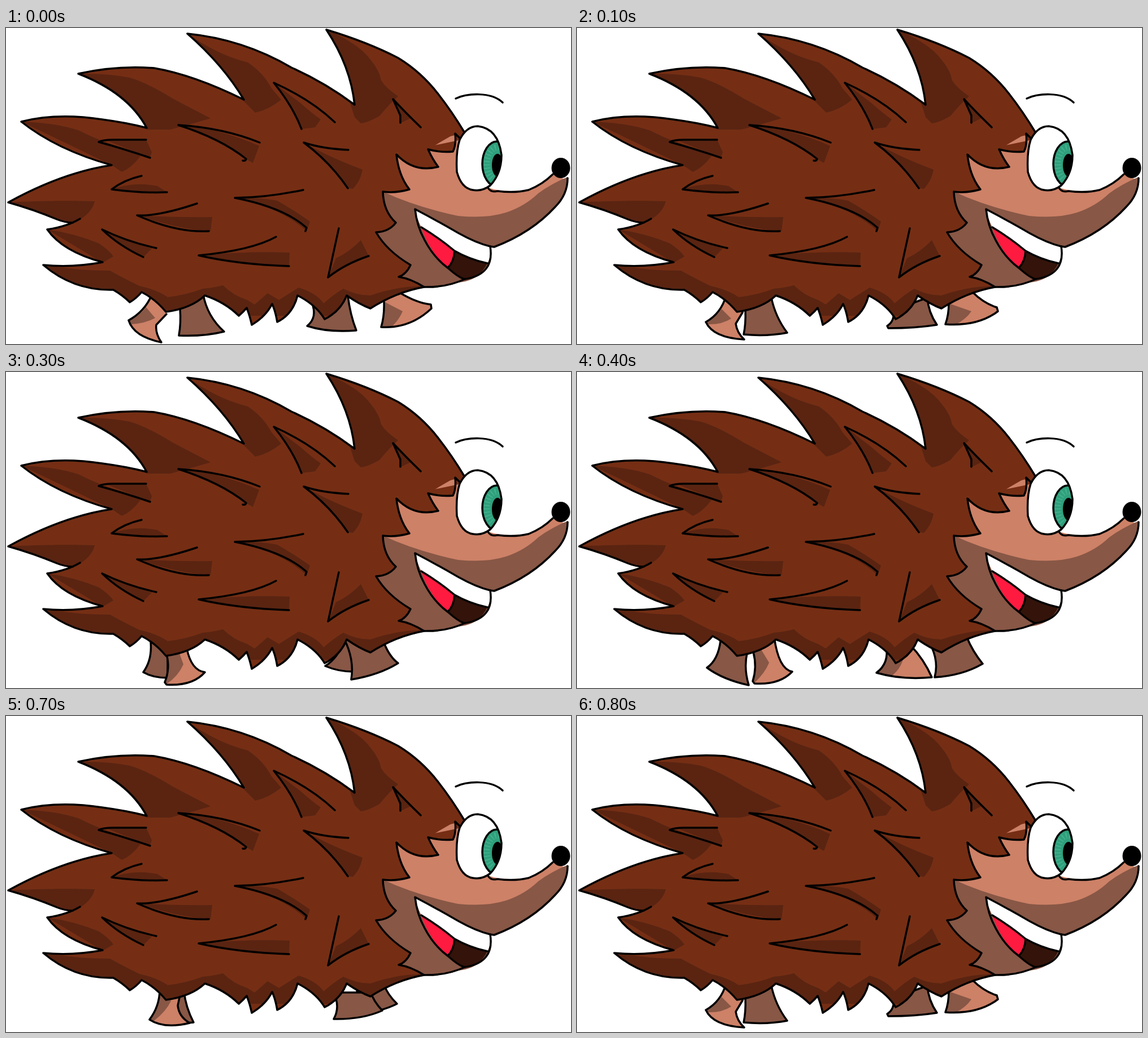
An HTML page for the animation above (0.9 s loop, 1000 by 560 pixels).

```html
<!DOCTYPE html>
<html lang="en">
<head>
<meta charset="utf-8">
<title>Walking hedgehog</title>
<style>
  html, body { margin: 0; width: 100%; height: 100%; overflow: hidden; background: #fff; }
  svg { display: block; width: 100vw; height: 100vh; }
  .fur { fill: #752e14; }
  .shade { fill: #5a2411; }
  .skin { fill: #cd8167; }
  .dim { fill: #885746; }
  .ink { fill: none; }
  .ink, .line { stroke: #000; stroke-width: 3.5; stroke-linecap: round; stroke-linejoin: round; }

  /* The stride swings through five poses and back again. */
  .pose { opacity: 0; animation: 900ms step-end infinite; }
  .p1 { animation-name: p1; }
  .p2 { animation-name: p2; }
  .p3 { animation-name: p3; }
  .p4 { animation-name: p4; }
  .p5 { animation-name: p5; }
  @keyframes p1 { 0% { opacity: 1 } 11.111%, 100% { opacity: 0 } }
  @keyframes p2 { 0%, 22.222% { opacity: 0 } 11.111%, 88.888%, 100% { opacity: 1 } }
  @keyframes p3 { 0%, 33.333%, 88.888%, 100% { opacity: 0 } 22.222%, 77.777% { opacity: 1 } }
  @keyframes p4 { 0%, 44.444%, 77.777%, 100% { opacity: 0 } 33.333%, 66.666% { opacity: 1 } }
  @keyframes p5 { 0%, 66.666%, 100% { opacity: 0 } 44.444% { opacity: 1 } }
</style>
</head>
<body>
<svg viewBox="0 0 1000 560" preserveAspectRatio="none">
  <defs>
    <path id="back" d="M118 345Q105 345 90 339Q50 322 4 309Q100 256 187 243Q90 216 27 166Q90 150 170 162Q215 168 249 177Q216 115 128 81Q195 66 262 71Q332 83 421 127Q385 66 321 10Q420 20 505 70Q565 97 617 136Q610 68 567 3Q640 25 694 53Q735 78 765 117Q790 149 812 186"/>
    <path id="belly" d="M806 198L795 187Q797 208 791 219Q768 221 747 215Q755 233 765 246Q722 257 691 224Q695 262 714 286Q690 293 667 290Q668 325 690 345Q678 361 655 362Q674 395 716 420Q708 437 695 441Q716 444 740 459Q690 468 645 497Q626 490 603 474Q592 502 564 516Q548 490 516 474Q508 507 480 521Q477 502 471 489Q460 511 435 526Q431 508 426 496Q420 503 412 510Q388 486 352 474Q328 497 283 503Q264 480 240 468Q231 479 219 486Q207 474 190 464Q120 466 66 420Q118 425 171 415Q100 396 73 357Q108 352 131 338"/>
    <path id="eye" d="M803 198Q815 174 835 174Q871 178 877 225Q877 258 857 279Q843 290 826 287Q806 284 798 255Q796 219 803 198Z"/>
    <clipPath id="furClip"><use href="#back"/><use href="#belly"/></clipPath>
    <clipPath id="eyeClip"><use href="#eye"/></clipPath>
  </defs>

  <g class="pose p1">
    <path class="skin" d="M260 470Q245 503 217 518Q226 547 275 557Q264 541 266 526L284 507L285 490Z"/>
    <path class="dim" d="M248 495Q236 511 217 518L221 525Q245 524 264 514Z"/>
    <path class="ink" d="M258 473Q245 503 217 518Q226 547 275 557Q264 541 266 526L284 507"/>
    <path class="dim line" d="M308 498Q310 522 306 545Q350 547 386 538Q356 511 349 472Z"/>
    <path class="dim line" d="M541 486Q552 513 533 528Q570 540 620 536Q609 508 605 474Z"/>
    <path class="skin" d="M669 485Q670 510 664 530Q715 533 753 497L752 490Q728 488 695 468Z"/>
    <path class="dim" d="M669 485Q670 510 664 530L682 530Q696 517 702 502Z"/>
    <path class="ink" d="M669 485Q670 510 664 530Q715 533 753 497L752 490Q728 488 695 468"/>
  </g>

  <g class="pose p2">
    <path class="skin" d="M264 474Q255 506 228 521Q241 549 296 552Q283 540 281 524L293 504L285 490Z"/>
    <path class="dim" d="M256 498Q246 513 228 521L233 525Q255 526 273 515Z"/>
    <path class="ink" d="M264 474Q255 506 228 521Q241 549 296 552Q283 540 281 524L293 504"/>
    <path class="dim line" d="M298 500Q299 524 295 543Q335 547 372 540Q351 512 344 478Z"/>
    <path class="dim line" d="M560 500Q563 519 549 528L551 532Q600 532 637 526Q622 504 620 478Z"/>
    <path class="skin" d="M658 488Q658 509 652 525Q710 529 745 502L743 495Q720 488 700 468Z"/>
    <path class="dim" d="M658 488Q658 509 652 525L669 526Q689 516 698 502Z"/>
    <path class="ink" d="M658 488Q658 509 652 525Q710 529 745 502L743 495Q720 488 700 468"/>
  </g>

  <g class="pose p3">
    <path class="dim line" d="M277 490Q279 518 270 539Q300 546 332 543Q318 516 315 488Z"/>
    <path class="skin" d="M272 485Q272 514 254 538Q280 555 325 544Q306 533 304 513L309 490Z"/>
    <path class="dim" d="M272 485Q272 514 254 538L262 540Q283 524 292 505Z"/>
    <path class="ink" d="M272 485Q272 514 254 538Q280 555 325 544Q306 533 304 513L309 490"/>
    <path class="dim line" d="M622 482Q619 510 608 525Q655 529 692 510Q675 493 670 478Z"/>
    <path class="dim line" d="M580 490Q592 516 580 537Q630 538 666 522Q650 505 646 490Z"/>
  </g>

  <g class="pose p4">
    <path class="dim line" d="M256 478Q259 510 243 532Q260 542 286 542V495Z"/>
    <path class="skin" d="M284 500Q291 525 281 550L284 554Q330 557 352 532Q328 529 320 490Z"/>
    <path class="dim" d="M284 500Q291 525 281 550L284 553Q305 539 314 518L306 496Z"/>
    <path class="ink" d="M284 500Q291 525 281 550L284 554Q330 557 352 532Q328 529 320 490"/>
    <path class="dim line" d="M598 476Q588 507 565 521Q588 531 615 531L610 490Z"/>
    <path class="dim line" d="M598 472Q617 509 611 545Q660 537 694 516Q679 505 669 480Z"/>
  </g>

  <g class="pose p5">
    <path class="dim line" d="M254 476Q250 510 230 524Q258 545 304 555Q295 526 301 498Z"/>
    <path class="skin" d="M312 496Q319 523 311 548L314 552Q358 555 381 531Q357 527 349 470Z"/>
    <path class="dim" d="M312 496Q319 523 311 548L314 551Q333 533 340 515L326 492Z"/>
    <path class="ink" d="M312 496Q319 523 311 548L314 552Q358 555 381 531Q357 527 349 470"/>
    <path class="skin" d="M547 486Q553 516 530 533Q575 546 628 541Q614 509 590 484Z"/>
    <path class="dim" d="M547 486Q553 516 530 533L556 539Q573 527 578 506Z"/>
    <path class="ink" d="M547 486Q553 516 530 533Q575 546 628 541Q614 509 590 484"/>
    <path class="dim line" d="M628 488Q640 515 633 541Q682 538 718 517Q700 495 690 470Z"/>
  </g>

  <!-- Head -->
  <path class="skin" d="M795 187L680 210L650 300L740 345H880L993 270L968 259Q950 277 925 287Q885 293 853 283L812 190Z"/>
  <path class="dim" d="M667 290Q725 317 800 333Q850 338 885 327Q918 316 942 293Q965 276 994 264Q994 295 972 317Q930 363 864 388L857 387Q862 410 846 430Q828 449 800 451Q775 461 740 459L640 420Z"/>
  <path class="ink" d="M853 283Q858 292 870 289Q900 293 925 287Q950 277 968 259M994 266Q994 295 972 317Q930 363 864 388L857 387M812 445Q780 460 740 459"/>
  <path fill="#fff" d="M724 321Q762 341 800 363Q832 381 857 387Q859 405 852 417Q820 410 794 395L735 353Q726 335 724 321Z"/>
  <path fill="#ff1a40" d="M735 353L794 395Q793 414 782 425Q750 398 735 353Z"/>
  <path fill="#34130a" d="M794 395Q820 410 852 417Q840 443 810 445L782 425Q793 414 794 395Z"/>
  <path class="ink" d="M724 321Q727 351 741 376Q757 407 783 426Q802 443 812 445Q865 437 857 387Q832 381 800 363Q762 341 724 321ZM735 353Q765 371 794 395Q820 410 852 417M794 395Q793 414 782 425"/>
  <ellipse cx="982" cy="248" rx="16.5" ry="18"/>
  <path class="ink" d="M796 125C815 116 858 112 879 132"/>

  <!-- Coat -->
  <g class="fur">
    <use href="#back"/>
    <use href="#belly"/>
    <path d="M118 345L300 250L600 170L812 186L806 198L795 187L747 215L690 222L400 350L131 338Z"/>
  </g>
  <g class="shade" clip-path="url(#furClip)">
    <path d="M567 3Q625 28 645 56Q661 75 664 93Q672 106 694 121Q678 135 661 156Q640 168 628 169L617 158Z"/>
    <path d="M321 10Q375 48 428 61Q456 80 470 107L487 127Q465 145 441 150L421 130Z"/>
    <path d="M128 81Q180 80 219 88Q250 97 295 125L362 160Q315 174 290 180H250Z"/>
    <path d="M27 166Q90 168 130 182Q165 200 205 212L238 227Q222 248 205 255L187 243Z"/>
    <path d="M4 309Q85 305 157 307Q153 325 133 338L100 350Z"/>
    <path d="M73 357Q122 364 165 382Q184 395 190 405L171 416Z"/>
    <path d="M66 420Q125 430 184 430Q215 447 236 457Q268 464 286 477Q320 473 348 462Q369 460 384 456Q402 474 427 482L440 490L463 470L483 482L518 460Q550 470 562 488Q580 472 597 462Q620 474 645 474Q690 458 740 457L650 510H180Z"/>
  </g>
  <g class="shade">
    <path d="M474 97L520 132Q540 150 557 162L547 176L523 179Q508 142 474 97Z"/>
    <path d="M690 132Q708 149 716 160L699 168Z"/>
    <path d="M305 172Q380 178 448 209L437 239L424 232Q380 197 305 172Z"/>
    <path d="M527 203Q570 228 631 251Q628 270 614 285L605 284Q573 237 527 203Z"/>
    <path d="M180 200Q215 195 248 198L258 220L255 230Q215 214 180 200Z"/>
    <path d="M187 286Q225 272 268 280L285 291Q240 293 187 286Z"/>
    <path d="M232 332Q300 336 365 335L362 360Q310 358 232 332Z"/>
    <path d="M405 301Q450 300 480 306Q510 323 538 343L532 360Q490 320 405 301Z"/>
    <path d="M170 357Q210 374 258 391L243 406Q200 385 170 357Z"/>
    <path d="M341 403Q430 395 502 398L501 422Q420 418 341 403Z"/>
    <path d="M571 440L584 408Q608 397 628 376L642 404Q600 420 571 440Z"/>
  </g>
  <g class="ink">
    <use href="#back"/>
    <use href="#belly"/>
    <path d="M523 179Q508 139 474 97Q540 127 582 167"/>
    <path d="M698 168V155L685 126Q706 149 734 176"/>
    <path d="M449 203Q385 177 305 172Q380 196 425 232Q424 236 419 235"/>
    <path d="M606 216Q560 214 527 203Q573 237 605 284"/>
    <path d="M248 198H190Q172 198 164 202Q205 213 255 230"/>
    <path d="M240 262Q209 269 187 286Q240 293 285 291"/>
    <path d="M338 311Q270 334 232 332Q302 363 359 360"/>
    <path d="M526 287Q460 301 405 301Q492 318 532 354L530 360"/>
    <path d="M266 390Q215 379 170 357Q200 386 243 406"/>
    <path d="M478 370Q435 394 341 403Q410 419 501 422"/>
    <path d="M589 355L570 442Q600 418 642 404"/>
  </g>

  <!-- Eye -->
  <use href="#eye" fill="#fff"/>
  <g clip-path="url(#eyeClip)">
    <ellipse cx="869" cy="241" rx="26" ry="40" fill="#2f9f7c"/>
    <ellipse cx="869" cy="241" rx="18" ry="29" fill="none" stroke="#43b08d" stroke-width="11" stroke-dasharray="2 4"/>
    <ellipse class="ink" cx="869" cy="241" rx="26" ry="40"/>
    <ellipse cx="870" cy="243" rx="10" ry="20"/>
  </g>
  <use class="ink" href="#eye"/>
</svg>
</body>
</html>
```
